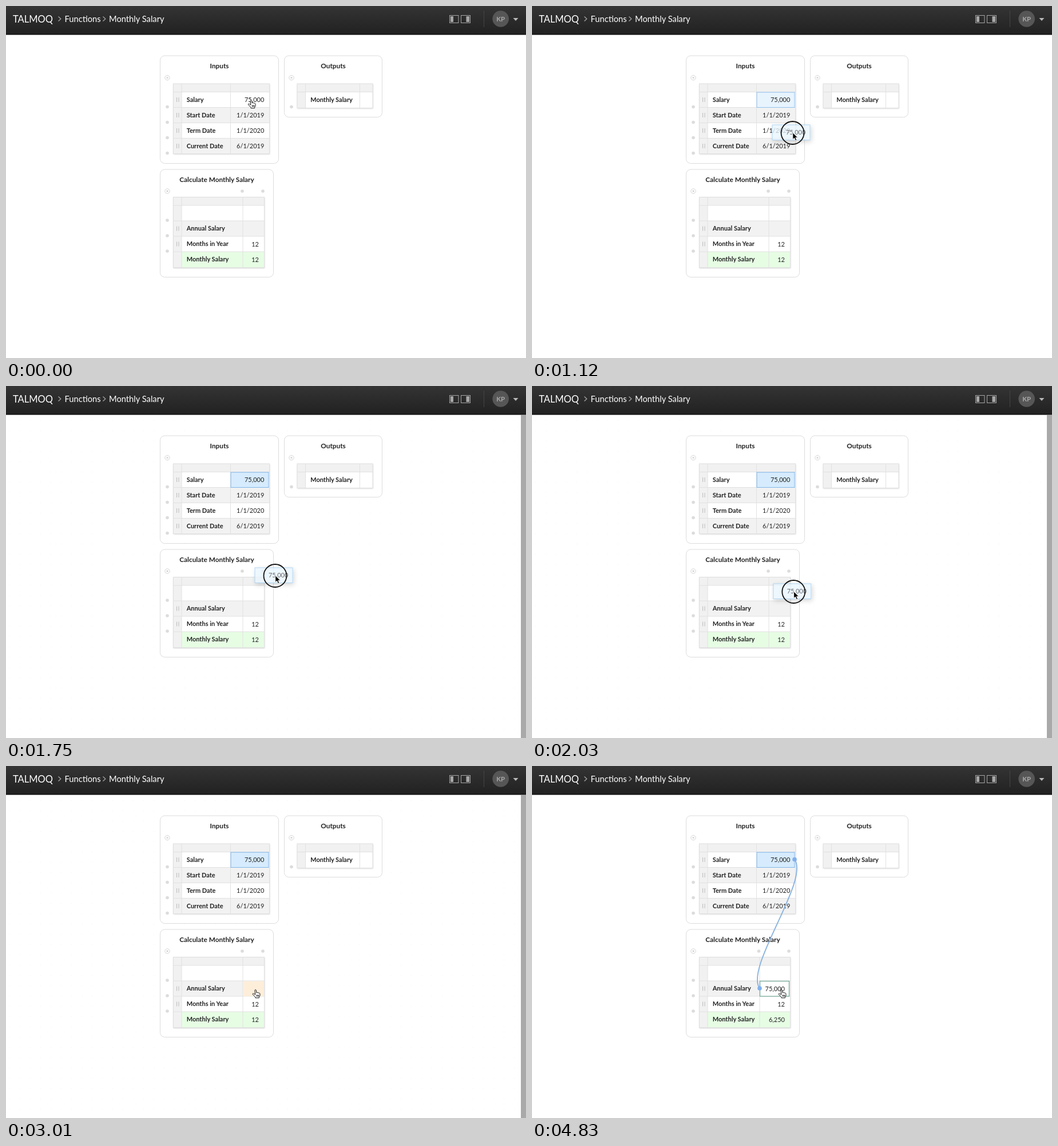
An HTML page that plays this animation: 909x616 px, repeating every 4900 ms.

```html
<!DOCTYPE html>
<html lang="en">
<head>
<meta charset="utf-8">
<title>Monthly Salary</title>
<style>
html, body { margin: 0; width: 100%; height: 100%; overflow: hidden; background: #fff; }
svg { display: block; width: 909px; height: 616px; font-family: Lato, sans-serif; }
.title { font-size: 11.8px; font-weight: 700; text-anchor: middle; fill: #222; }
.label { font-size: 11px; font-weight: 700; fill: #222; }
.num { font-size: 11px; text-anchor: end; fill: #222; }
.crumb { font-size: 14.7px; fill: #fff; }
.line { stroke: #e1e1e1; fill: none; }
.dot { fill: #dcdcdc; }
</style>
</head>
<body>
<svg id="stage" viewBox="0 0 909 616"></svg>
<script>
const LOOP = 4900, STEP = 70;

const rect = (x, y, w, h, fill, extra = '') =>
  `<rect x="${x}" y="${y}" width="${w}" height="${h}" fill="${fill}" ${extra}/>`;
const text = (x, y, cls, str, extra = '') => `<text x="${x}" y="${y}" class="${cls}" ${extra}>${str}</text>`;
const path = (d, attrs) => `<path d="${d}" ${attrs}/>`;
const dot = (x, y, extra = '') => `<circle cx="${x}" cy="${y}" r="2.8" class="dot" ${extra}/>`;
const target = (x, y) =>
  `<circle cx="${x}" cy="${y}" r="4.2" fill="#fff" stroke="#d6d6d6"/>` +
  path(`M${x - 1.5} ${y - 1.5}l3 3m0-3l-3 3`, 'stroke="#c4c4c4"');
const panel = (x, y, w, h, name) =>
  rect(x, y, w, h, '#fff', 'rx="8" stroke="#dcdcdc"') + text(x + w / 2, y + 22, 'title', name);

// A table: header strip, handle column, then rows of {label, fill, h, grip}.
function table(x, y, w, split, rows) {
  const height = 14.5 + rows.reduce((sum, r) => sum + r.h, 0);
  let top = y + 14.5;
  let out = rect(x, y, w, height, '#f1f1f1', 'filter="url(#soft)"');
  let lines = `M${x} ${top}h${w}M${x + 14.5} ${y}v${height}`;
  for (const r of rows) {
    out += rect(x + 14.5, top, w - 14.5, r.h, r.fill);
    if (r.label) out += text(x + 23.2, top + 17.4, 'label', r.label);
    if (r.grip) out += path(`M${x + 6} ${top + 9.5}v8m3.5-8v8`, 'stroke="#bcbcbc"');
    top += r.h;
    lines += `M${x} ${top}h${w}`;
  }
  out += path(lines, 'class="line"') + rect(x, y, w, height, 'none', 'stroke="#dfdfdf"');
  if (split) out += path(`M${split} ${y}v${height}`, 'class="line"');
  return out;
}

const row = (label, fill = '#fff', grip = true, h = 27) => ({ label, fill, grip, h });
const GREY = '#f2f2f2', GREEN = '#e6fde4';

const header =
  rect(0, 0, 909, 50, 'url(#bar)') + rect(0, 49, 909, 1.5, '#0e0e0e') +
  text(12, 28.6, 'crumb', 'TALMOQ', 'style="font-size:16.5px"') +
  path('M91.5 18.5l4.3 4-4.3 4M169.5 18.5l4.3 4-4.3 4', 'fill="none" stroke="#aaa" stroke-width="1.2"') +
  text(102.5, 28, 'crumb', 'Functions') + text(180, 28, 'crumb', 'Monthly Salary') +
  rect(775.5, 16.5, 15.5, 13, 'none', 'stroke="#a8a8a8"') + rect(777, 18, 5, 10, '#a8a8a8') +
  rect(795.5, 16.5, 16, 13, 'none', 'stroke="#a8a8a8"') + rect(804.5, 18, 5.5, 10, '#a8a8a8') +
  path('M835.5 8v29', 'stroke="#444"') +
  '<circle cx="864.7" cy="22.5" r="14.3" fill="#565656"/>' +
  text(864.7, 26.6, 'title', 'KP', 'style="font-size:11.5px;fill:#aaa"') +
  path('M886.5 21h9l-4.5 5z', 'fill="#b8b8b8"');

const inputs =
  panel(269.5, 87, 207, 188.5, 'Inputs') + target(282, 125.5) +
  [176.5, 203.5, 230.5, 257.5].map(y => dot(282, y)).join('') +
  table(292.5, 136, 168, 392.5,
    [row('Salary'), row('Start Date', GREY), row('Term Date'), row('Current Date', GREY)]) +
  rect(393, 151, 66, 26.5, '#e7f4fe', 'id="source" stroke="#93c2ee"') +
  ['75,000', '1/1/2019', '1/1/2020', '6/1/2019'].map((v, i) => text(451.3, 167.9 + 27 * i, 'num', v)).join('');

const outputs =
  panel(486.5, 87, 171, 107.5, 'Outputs') + target(499, 125.5) + dot(499, 176.5) +
  table(509, 136, 132, 618.5, [row('Monthly Salary', '#fff', false, 28)]);

const calc =
  panel(269.5, 286, 198, 188.5, 'Calculate Monthly Salary') + target(282, 324) +
  [375, 402, 429].map(y => dot(282, y)).join('') + dot(449, 324) + dot(413, 324, 'id="colDot"') +
  table(292.5, 334.5, 159, 0, [row('', '#fff', false), row('Annual Salary', GREY),
    row('Months in Year'), row('Monthly Salary', GREEN, false, 28)]) +
  path('M0 334.5v124', 'id="colLine" class="line"') +
  rect(414.5, 376.5, 36, 26.5, '#fdeeda', 'id="drop"') +
  text(442, 420.9, 'num', '12') + text(442, 447.9, 'num', '12', 'id="total"');

const link = '<g id="link">' +
  rect(398.5, 376.5, 51, 26.5, '#fff', 'stroke="#6fa596" stroke-width="1.2"') +
  text(442, 393.9, 'num', '75,000') +
  path('M459 163.5C486 200 371 353 398 389', 'fill="none" stroke="#86b1e0" stroke-width="1.8"') +
  '<g fill="#80b0ec"><circle cx="459" cy="163.5" r="3.8"/><circle cx="398" cy="389" r="3.8"/></g></g>';

// Pointer parts are drawn around a hot spot at 0,0.
const pointer =
  '<g id="ghost">' +
  '<g opacity=".78">' + rect(-35.5, -14, 66, 26.5, '#e9f5fe', 'stroke="#9ccbf0" filter="url(#lift)"') + '</g>' +
  text(22.8, 3, 'num', '75,000', 'opacity=".65"') + '</g>' +
  '<circle id="ring" r="20" fill="none" stroke="#111" stroke-width="1.8"/>' +
  path('M.3-.5v12l2.8-2.5 2 4.6 2.2-1-2-4.4h3.8z',
    'id="arrow" fill="#000" stroke="#fff" stroke-width=".9"') +
  path('M-1.3 1.2c0-1.6 2.2-1.6 2.4 0l.6 4.2c.3-1 2-.9 2.1.2.5-.8 1.9-.6 2 .4.7-.5 1.8 0 1.8 1.1v3.2l-1.4 2.4v1.6H-.5v-1.4L-4.8 8.3c-.9-1.5.8-2.4 1.9-1.3L-.6 8.7zM1.9 9v3m1.7-3v3m1.7-3v3',
    'id="hand" fill="#fff" stroke="#111" stroke-width="1"');

document.getElementById('stage').innerHTML = `<defs>
  <linearGradient id="bar" x2="0" y2="1"><stop stop-color="#343434"/><stop offset="1" stop-color="#212121"/></linearGradient>
  <filter id="soft"><feDropShadow dx=".5" dy="1" stdDeviation="1" flood-opacity=".18"/></filter>
  <filter id="lift" x="-30%" y="-60%" width="160%" height="220%"><feDropShadow dx="2" dy="3" stdDeviation="4" flood-opacity=".2"/></filter>
  <pattern id="grid" width="18" height="18" patternUnits="userSpaceOnUse"><rect x="6" y="6" width="1" height="1" fill="#f4f4f4"/></pattern>
  </defs>` +
  rect(0, 0, 909, 616, '#fff') +
  '<g id="dragAids">' + rect(0, 51, 900, 565, 'url(#grid)') + rect(900, 51, 9, 565, '#a9a9a9') + '</g>' +
  header + inputs + outputs + calc + link + `<g id="pointer">${pointer}</g>`;

const el = {};
document.querySelectorAll('[id]').forEach(node => el[node.id] = node);

const PRESS = 700, DRAG = 840, AIDS = 1260, RELEASE = 2660, AIDS_END = 3080, LINKED = 3150;
// time, x, y of the pointer
const route = [
  [0, 428.5, 164.5], [840, 428.5, 164.5], [910, 431, 172], [980, 436, 187], [1050, 436, 187],
  [1120, 455.5, 222], [1400, 469, 278], [1610, 472, 318], [1750, 470.5, 332], [2100, 454, 367],
  [2170, 454, 367], [2380, 441, 386], [2660, 436.3, 391.5], [LOOP, 436.3, 391.5]
];

function pointerAt(t) {
  const i = route.findIndex(p => p[0] > t);
  const a = route[i - 1], b = route[i], k = (t - a[0]) / (b[0] - a[0]);
  return [a[1] + (b[1] - a[1]) * k, a[2] + (b[2] - a[2]) * k];
}

const show = (node, on) => node.setAttribute('visibility', on ? 'visible' : 'hidden');

function draw(t) {
  const dragging = t >= DRAG && t < RELEASE, linked = t >= LINKED, deep = t >= AIDS;
  el.pointer.setAttribute('transform', `translate(${pointerAt(t)})`);
  show(el.ghost, dragging);
  show(el.arrow, dragging);
  show(el.hand, !dragging);
  show(el.ring, t >= PRESS && t < RELEASE);
  el.ring.setAttribute('r', t < DRAG ? 28 : 20);
  show(el.source, t >= DRAG);
  el.source.setAttribute('fill', deep ? '#d6ebfd' : '#e7f4fe');
  el.source.setAttribute('stroke', deep ? '#82b6e8' : '#93c2ee');
  show(el.dragAids, deep && t < AIDS_END);
  show(el.drop, t >= RELEASE && !linked);
  show(el.link, linked);
  el.total.textContent = linked ? '6,250' : '12';
  el.colLine.setAttribute('transform', `translate(${linked ? 398 : 414})`);
  el.colDot.setAttribute('cx', linked ? 396.5 : 413);
}

const start = performance.now();
function tick() {
  const t = (performance.now() - start) % LOOP;
  draw(Math.floor(t / STEP) * STEP);
  requestAnimationFrame(tick);
}
tick();
</script>
</body>
</html>
```
